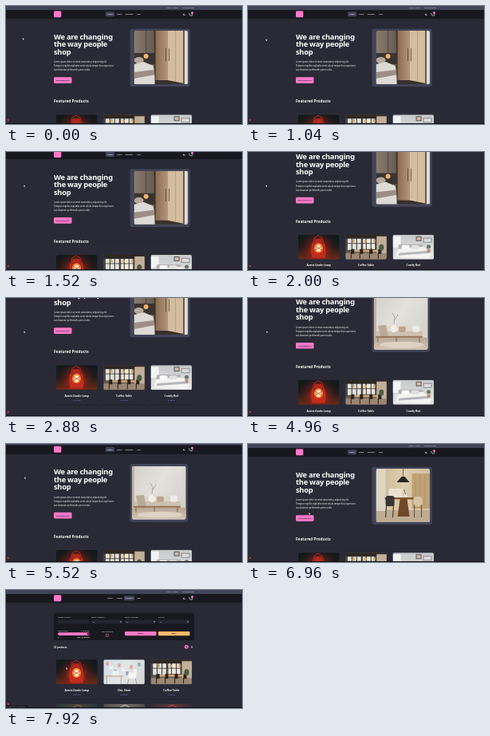
Recreate the animation shown at these times as an HTML page with a canvas. Size 296x148 px, loop 8 s.

```html
<!DOCTYPE html>
<html lang="en">
<head>
<meta charset="utf-8">
<title>Furniture shop</title>
<style>
html, body { margin: 0; width: 100%; height: 100%; overflow: hidden; background: #282a36; }
canvas { display: block; width: 296px; height: 148px; }
</style>
</head>
<body>
<canvas id="stage" width="296" height="148"></canvas>
<script>
const g = document.getElementById('stage').getContext('2d');
const LOOP = 8000, PAGE_SWITCH = 7440;
const BASE = '#2a2a37', DARK = '#181920', NEUTRAL = '#414558';
const PINK = '#ff79c6', ORANGE = '#ffb86c', PURPLE = '#bd93f9', WHITE = '#f8f8f2';

function box(x, y, w, h, color, r = 0) {
  g.fillStyle = color;
  g.beginPath();
  g.roundRect(x, y, w, h, r);
  g.fill();
}
function disc(x, y, rx, color, ry = rx) {
  g.fillStyle = color;
  g.beginPath();
  g.ellipse(x, y, rx, ry, 0, 0, 7);
  g.fill();
}
function poly(color, ...p) {
  g.fillStyle = color;
  g.beginPath();
  for (let i = 0; i < p.length; i += 2) g.lineTo(p[i], p[i + 1]);
  g.fill();
}
function line(color, width, ...p) {
  g.strokeStyle = color;
  g.lineWidth = width;
  g.beginPath();
  for (let i = 0; i < p.length; i += 2) g.lineTo(p[i], p[i + 1]);
  g.stroke();
}
function text(s, x, y, size, color = WHITE, weight = 500, align = 'left') {
  g.font = `${weight} ${size}px "Noto Sans", "Open Sans", sans-serif`;
  g.textAlign = align;
  g.fillStyle = color;
  g.fillText(s, x, y);
}
function fade(x0, y0, x1, y1, ...colors) {
  const f = g.createLinearGradient(x0, y0, x1, y1);
  colors.forEach((c, i) => f.addColorStop(i / (colors.length - 1), c));
  return f;
}
function photo(x, y, w, h, r, paint) {
  g.save();
  g.translate(x, y);
  g.beginPath();
  g.roundRect(0, 0, w, h, r);
  g.clip();
  paint();
  g.restore();
}

// Hero pictures, 67.5 x 67
function bedroom() {
  box(0, 0, 68, 67, fade(0, 0, 26, 0, '#8b7c6e', '#665a50'));
  box(0, 28, 27, 14, '#3b3330');
  line('#302c2b', .6, 15, 0, 15, 29);
  disc(15, 32, 3, '#f0b36c');
  disc(6, 37, 6, '#b7a99c', 4);
  poly('#dedad5', 0, 42, 12, 39, 24, 44, 28, 67, 0, 67);
  poly('#9b8e86', 0, 52, 25, 49, 27, 55, 0, 60);
  poly('#3a302b', 25, 0, 30, 0, 30, 60, 62, 65, 62, 67, 26, 67);
  box(27, 0, 15, 62, fade(27, 0, 42, 0, '#8a6c51', '#b2957a'));
  poly('#d4bd9f', 42, 0, 62, 0, 62, 66, 42, 62);
  line('#a88d71', .6, 52, 0, 52, 64);
  line('#4b3c33', .8, 40, 22, 40, 38);
  line('#4b3c33', .8, 44, 22, 44, 38);
  box(62, 0, 6, 67, '#dedbd5');
  line('#39332f', 1.4, 62.5, 0, 62.5, 67);
}
function lounge() {
  box(0, 0, 68, 67, fade(0, 0, 68, 40, '#d3d0cb', '#e4e1dd', '#d6d2cc'));
  box(0, 52, 68, 15, fade(0, 52, 0, 67, '#b9a895', '#d2c4b3'));
  box(0, 0, 3, 52, '#bfb4a6');
  line('#8a806f', .6, 25, 35, 26, 27, 23, 21);
  line('#8a806f', .6, 26, 30, 30, 23);
  box(3, 37, 57, 13, '#ded6ca', 2);
  box(3, 44, 58, 6, '#cdc1b1', 1);
  poly('#b9aa98', 5, 37, 15, 36, 18, 52, 9, 54);
  disc(25, 41, 4.5, '#f2efea');
  box(31, 38, 9, 7, '#bca58e', 2);
  box(48, 37, 9, 8, '#eeeae3', 2);
  box(2, 50, 59, 2, '#957253');
  for (const x of [5, 28, 57]) line('#83644b', 1, x, 52, x, 58);
  disc(35, 61, 28, '#ded2c3', 4);
}
function dining() {
  box(0, 0, 68, 67, fade(0, 0, 68, 0, '#cab694', '#ddcdae', '#d2c1a2'));
  box(0, 52, 68, 15, '#bdac92');
  box(0, 0, 12, 53, '#ddd5c4');
  box(45, 6, 23, 44, '#c0a276');
  for (let x = 49; x < 68; x += 6) line('#a88a62', .5, x, 6, x, 50);
  line('#292624', .6, 34, 0, 34, 11);
  poly('#292624', 32, 10, 36, 10, 42, 17, 26, 17);
  box(16, 25, 17, 14, '#eae2d1', 1);
  box(11, 36, 46, 2.5, '#83562f', 1);
  poly('#70482b', 30, 38, 39, 38, 42, 60, 27, 60);
  box(12, 34, 11, 13, '#393633', 3);
  for (const x of [13, 22]) line('#292725', 1, x, 45, x - 1, 61);
  box(47, 35, 11, 12, '#d7c5a2', 3);
  for (const x of [48, 57]) line('#5f432d', 1, x, 45, x, 61);
  disc(37, 34, 2, '#eee7db');
  line('#54614b', .8, 37, 32, 35, 26);
}

// Product pictures, 51.5 x 30.5
function lamp() {
  box(0, 0, 52, 31, fade(0, 0, 0, 31, '#10191b', '#1d1c1b', '#6b2c17'));
  const glow = g.createRadialGradient(25, 19, 2, 25, 19, 24);
  glow.addColorStop(0, '#ff4a20');
  glow.addColorStop(.45, '#a6201980');
  glow.addColorStop(1, '#60151000');
  box(0, 0, 52, 31, glow);
  line('#d23a2c', .7, 18, 14, 20, 4, 25, 1, 30, 4, 33, 14);
  poly('#b3261c', 21, 5, 29, 5, 31, 11, 19, 11);
  disc(25.5, 16.5, 5.5, '#ff8a3c', 6);
  disc(25.5, 17, 3.2, '#fff1c4', 4.2);
  line('#d1301f', 1.2, 18, 11, 17, 24);
  line('#d1301f', 1.2, 32, 11, 34, 24);
  line('#d1301f', .7, 19, 13, 32, 21);
  line('#d1301f', .7, 32, 13, 19, 21);
  box(17, 23, 17, 6, '#c22c1e', 1.5);
}
function table() {
  box(0, 0, 52, 31, '#64564a');
  box(0, 0, 52, 5, '#2e2823');
  box(2, 5, 18, 14, '#dfe2dc');
  box(22, 5, 15, 13, '#eceadf');
  for (let x = 2; x < 40; x += 6) line('#332b26', 1, x, 3, x, 20);
  line('#332b26', .8, 2, 11, 38, 11);
  box(39, 2, 13, 23, '#c0b09a');
  for (const x of [10, 25, 36]) {
    line('#282523', .5, x, 0, x, 7);
    disc(x, 8, 1.6, '#dda55e');
  }
  box(0, 23, 52, 8, '#9a8672');
  box(9, 19, 32, 2.5, '#d2a878');
  for (const x of [7, 18, 30, 41]) {
    box(x, 18, 4, 6, '#27221f');
    line('#211d1b', 1, x, 23, x, 30);
  }
  disc(45, 16, 3, '#4d5c42', 4);
}
function bed() {
  box(0, 0, 52, 31, fade(0, 0, 0, 31, '#c6c8ca', '#e6e6e5'));
  box(29, 2, 7, 6, '#55575b');
  box(30, 3, 5, 4, '#d9b3ae');
  box(38, 4, 11, 6, '#8b8c8f');
  box(39, 5, 9, 4, '#dcdcdb');
  box(0, 2, 10, 14, '#f1f4f4');
  box(7, 12, 31, 8, '#b5b3b2', 2);
  poly('#f4f3f1', 6, 18, 38, 15, 49, 24, 45, 30, 4, 28);
  box(11, 13, 10, 5, '#fbfaf8', 2);
  box(23, 13, 10, 5, '#dfe0e1', 2);
  poly('#b4b6ba', 8, 23, 46, 20, 47, 23, 7, 26);
  disc(45, 15, 2.5, '#6a7562');
  box(43, 18, 4, 4, '#b59370');
}
function chair() {
  box(0, 0, 52, 31, fade(0, 0, 52, 31, '#cfdce5', '#e2e6e8', '#d3d3d1'));
  for (let i = 0; i < 9; i++)
    box(3 + i * 5, 3 + i * 5 % 13, 3.5, 4.5, ['#dba79d', '#f6f4f0', '#8ea9b8'][i % 3]);
  box(2, 20, 22, 1.2, '#c9a987');
  for (const x of [4, 22]) line('#a98d70', .7, x, 21, x, 31);
  box(11, 14, 8, 6, '#edf1f4');
  box(31, 16, 10, 8, '#f7f5f2', 3);
  line('#a9825f', .7, 32, 24, 30, 31);
  line('#a9825f', .7, 40, 24, 42, 31);
}
function plain(a, b, c) {
  return () => {
    box(0, 0, 52, 31, fade(0, 0, 52, 0, a, b, a));
    line(c, 1, 20, 5, 27, 1, 34, 5);
  };
}

const shot = {
  lamp: [lamp, 'Avant-Garde Lamp', '$179.99'],
  chair: [chair, 'Chic Chair', '$339.99'],
  table: [table, 'Coffee Table', '$179.99'],
  bed: [bed, 'Comfy Bed', '$129.99'],
  sofa: [plain('#26393a', '#4c4438', '#8a6749'), 'Contemporary Sofa', '$159.99'],
  cutting: [plain('#4f4d4b', '#777066', '#c7c1b6'), 'Cutting-Edge Bed', '$84.99'],
  rug: [plain('#332e32', '#65343b', '#b64950'), 'Fancy Rug', '$299.99']
};
function cards(y, names) {
  names.forEach((name, i) => {
    const [paint, title, price] = shot[name], x = 60.3 + i * 59.3;
    box(x + 1, y + 49, 55, 2, '#252531', 1);
    photo(x + 2.7, y, 51.5, 31, 2, paint);
    text(title, x + 28.5, y + 39.8, 3.3, WHITE, 600, 'center');
    text(price, x + 28.5, y + 44.8, 2.5, PURPLE, 500, 'center');
  });
}

function header(active) {
  box(0, 0, 296, 5, NEUTRAL);
  text('Sign in / Guest', 201.5, 3.3, 2.1);
  text('Create Account', 236, 3.3, 2.1, WHITE, 500, 'right');
  box(0, 5, 296, 11.3, DARK);
  box(60, 6.3, 9.3, 8, PINK, 1.3);
  [['Home', 125, 11], ['About', 137.2, 10], ['Products', 148, 13], ['Cart', 162, 9]].forEach(([s, x, w], i) => {
    if (i === active) box(x, 7.3, w, 6, NEUTRAL, 1.2);
    text(s, x + w / 2, 11, 2.2, WHITE, 600, 'center');
  });
  disc(223.5, 10.6, 1.2, WHITE);
  disc(224.1, 10.1, 1, DARK);
  line(WHITE, .6, 229, 9.5, 230, 9.5, 231, 12, 233.5, 12, 234, 10);
  disc(233.5, 8.5, 1.5, PINK);
}

function home(slide) {
  header(0);
  g.letterSpacing = '-0.23px';
  ['We are changing', 'the way people', 'shop'].forEach((s, i) => text(s, 60, 41.9 + i * 9.5, 9.25, '#fff', 700));
  g.letterSpacing = '0px';
  ['Lorem ipsum dolor sit amet consectetur, adipisicing elit.',
   'Tempore repellat explicabo enim soluta temporibus asperiores',
   'aut obcaecati perferendis porro nobis.'].forEach((s, i) => text(s, 60, 71 + i * 5.1, 2.55));
  box(60, 89.3, 22.5, 7.7, PINK, 1.4);
  text('OUR PRODUCTS', 71.2, 94, 2.15, '#28141f', 600, 'center');
  const wide = 2.6 * Math.abs(1 - slide);
  photo(155.3, 28.5, 72.8 + wide, 72.7, 3, () => {
    box(0, 0, 76, 73, NEUTRAL);
    [bedroom, lounge, dining].forEach((paint, i) =>
      photo(2.7 + wide + (i - slide) * 77, 2.6, 67.5, 67.2, 2.3, paint));
  });
  text('Featured Products', 60, 121.2, 4.75, WHITE, 600);
  line('#30313e', .4, 60, 126.5, 236, 126.5);
  cards(136.2, ['lamp', 'table', 'bed']);
}

function products() {
  header(2);
  box(60, 28.5, 176, 34.5, DARK, 1.5);
  const cols = [65, 107, 149, 191];
  ['Search Product', 'Select Category', 'Select Company', 'Sort By'].forEach((s, i) => {
    text(s, cols[i], 35, 2.3);
    box(cols[i], 37.6, 39.5, 4.7, '#242530', 1);
    if (i) {
      text(i < 3 ? 'all' : 'a-z', cols[i] + 2, 40.7, 2.1);
      poly(WHITE, cols[i] + 36, 39.5, cols[i] + 38, 39.5, cols[i] + 37, 40.8);
    }
  });
  text('Select Price', 65, 51.5, 2.3);
  text('$1,000.00', 104.5, 51.5, 2.3, WHITE, 500, 'right');
  box(65, 53.3, 39.5, 3.6, PINK, 1.8);
  disc(102.8, 55.1, 1.2, DARK);
  text('0', 65, 60, 2.1, WHITE, 700);
  text('Max : $1,000.00', 104.5, 60, 2.1, WHITE, 700, 'right');
  text('Free Shipping', 127, 53.3, 2.2, WHITE, 500, 'center');
  g.strokeStyle = PINK;
  g.lineWidth = .5;
  g.strokeRect(125.7, 55.6, 2.7, 2.7);
  [['SEARCH', 149, PINK], ['RESET', 191, ORANGE]].forEach(([s, x, color]) => {
    box(x, 52, 39.5, 5.3, color, 1.2);
    text(s, x + 19.7, 55.4, 2.1, '#28181d', 600, 'center');
  });
  text('22 products', 60, 72.5, 2.8, WHITE, 600);
  disc(226.3, 71.3, 2.5, PINK);
  for (let i = 0; i < 4; i++) box(225.2 + i % 2 * 1.3, 70.2 + (i >> 1) * 1.3, .9, .9, '#4b2039');
  for (let i = 0; i < 3; i++) box(232, 70.3 + i, 2.2, .4, WHITE);
  line('#30313e', .4, 60, 76.5, 236, 76.5);
  cards(87.2, ['lamp', 'chair', 'table']);
  cards(143, ['sofa', 'cutting', 'rug']);
}

// Piecewise track of [time, value] stops
function track(t, stops, ease = k => k) {
  let [t0, v0] = stops[0];
  for (const [t1, v1] of stops) {
    if (t < t1) return v0 + (v1 - v0) * ease(Math.max(0, (t - t0) / (t1 - t0)));
    [t0, v0] = [t1, v1];
  }
  return v0;
}
const smooth = k => k * k * (3 - 2 * k);

function draw(t) {
  const scroll = track(t, [[1360, 0], [1760, 18], [2000, 32.5], [2480, 52], [4600, 52], [5280, 17], [5520, 3.5], [5640, 0]]);
  const slide = track(t, [[2960, 0], [3400, 1], [6280, 1], [6720, 2]], smooth);
  const x = track(t, [[0, 21], [480, 22.5], [2800, 22.5], [3400, 23.3], [6320, 23.3], [6900, 76.5], [7000, 76.5], [7360, 154], [7480, 154], [7880, 75.5]], smooth);
  const y = track(t, [[0, 40], [480, 41.3], [6320, 41.3], [6900, 86], [7000, 86], [7360, 10], [7480, 10], [7880, 97]], smooth);

  box(0, 0, 296, 148, BASE);
  g.save();
  if (t < PAGE_SWITCH) {
    g.translate(0, -scroll);
    home(slide);
  } else products();
  g.restore();
  box(0, 147, 296, 1, '#111217');
  disc(2.7, 143, 1.5, '#7d2f33');
  disc(2.7, 143, .6, '#d1877b');
  if (t > 7800) {
    // Link hint while the pointer rests on a card
    box(0, 145, 27, 3, '#101116');
    text('localhost:5173/products/1', 1, 147.2, 2, '#c8c8c8');
  }
  poly('#fff', x, y, x, y + 2.4, x + .6, y + 1.9, x + 1, y + 2.7, x + 1.4, y + 2.5, x + 1, y + 1.7, x + 1.7, y + 1.7);
}

const start = performance.now();
function tick() {
  draw((performance.now() - start) % LOOP);
  requestAnimationFrame(tick);
}
tick();
</script>
</body>
</html>
```
